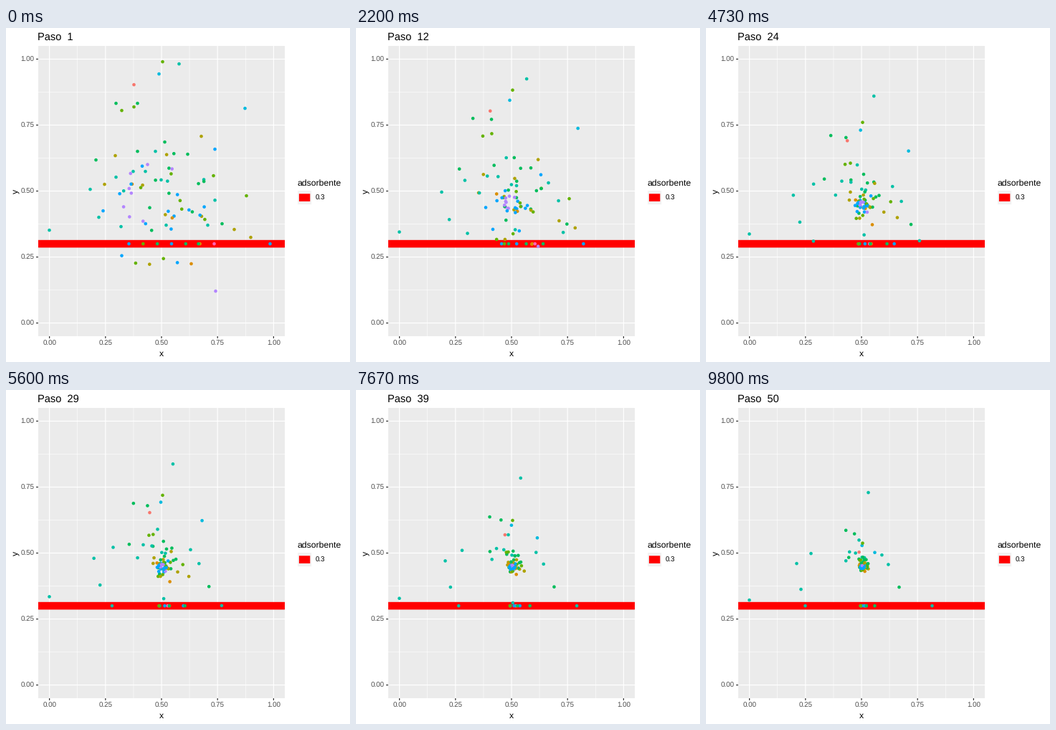
A matplotlib script that plays this animation: 480 px wide and 466 px high, repeating every 9.99 s.

```python
import numpy as np
import matplotlib.pyplot as plt
from matplotlib.animation import FuncAnimation
from matplotlib.patches import Rectangle

W, H, DPI = 480, 466, 100
FRAMES, LOOP_MS, STEPS = 150, 9990, 50
PT = 72 / DPI
plt.rcParams.update({"font.family": "Liberation Sans", "text.hinting": "none"})

LEFT, RIGHT, TOP, BOTTOM = 45, 389, 25, 430
BAR_Y, BAR_H = 301.1, 10.6
CORE = np.array([218.0, 246.5])
SOFT = 22               # distance at which the pull starts to fade

# Hue and pull speed (px per step) of each charge class
CLASSES = {
    "salmon": ("#F8766D", 3.5), "orange": ("#DB8E00", 3.0),
    "olive": ("#AEA200", 3.6), "lime": ("#64B200", 3.65),
    "green": ("#00BD5C", 2.15), "teal": ("#00C1A7", 0.9),
    "cyan": ("#00BADE", 3.4), "blue": ("#00A6FF", 4.8),
    "violet": ("#B385FF", 7.0), "pink": ("#FF63B6", 4.5),
}


def px(u):
    return LEFT + (RIGHT - LEFT) * (u + 0.05) / 1.1


def py(v):
    return BOTTOM - (BOTTOM - TOP) * (v + 0.05) / 1.1


# ---- particles ---------------------------------------------------------
rng = np.random.default_rng(9)
pulled, drifting = [], []      # (class, start, goal) and (class, start, shift)

# Lone particles far from the core
OUTER = {
    "salmon": [(178, 79)],
    "lime": [(218, 47), (178, 110), (161, 115), (335, 234), (289, 206)],
    "green": [(153, 105), (183, 105), (221, 159), (183, 172), (125, 184),
              (253, 176)],
    "olive": [(272, 151), (341, 292), (318, 281), (152, 178), (137, 218)],
    "cyan": [(213, 64), (333, 112)],
    "blue": [(291, 169), (135, 255)],
    "teal": [(208, 172), (177, 200), (194, 200)],
    "violet": [(292, 367)],
}
for name, starts in OUTER.items():
    pulled += [(name, p, CORE) for p in starts]

# The crowd: a seeded disc, flattened where it meets the band
CROWD = {"green": 9, "teal": 5, "lime": 5, "olive": 4, "orange": 2,
         "blue": 11, "violet": 8}
for name, count in CROWD.items():
    for _ in range(count):
        r, a = rng.uniform(18, 74), rng.uniform(0, 2 * np.pi)
        dx, dy = r * np.cos(a), r * np.sin(a)
        pulled.append((name, CORE + (dx, dy * (0.55 if dy > 0 else 1)), CORE))

# A few below the band, and a row caught on it
for x, name in zip(np.linspace(161, 258, 6),
                   ["blue", "lime", "olive", "lime", "blue", "orange"]):
    pulled.append((name, (x, rng.uniform(317, 331)), CORE))
row = ["blue", "lime", "green", "blue", "green", "orange", "pink"]
on_bar = list(zip(np.linspace(171, 290, len(row)), row)) + [(368, "blue")]
for x, name in on_bar:
    pulled.append((name, (x, 301), (CORE[0], 301)))

# Nearly neutral particles just drift
for name, start, shift in [
        ("teal", (241, 50), (-15, 93)), ("teal", (60, 282), (0, 11)),
        ("teal", (117, 225), (9, 17)), ("teal", (129, 264), (3, 14)),
        ("teal", (153, 208), (-7, 20)), ("teal", (160, 277), (-22, 42)),
        ("teal", (281, 275), (34, 45)), ("teal", (223, 275), (-6, 28)),
        ("green", (301, 273), (-32, 2)), ("green", (268, 301), (-33, 0))]:
    drifting.append((name, start, shift))

start = np.array([p for _, p, _ in pulled], float)
goal = np.array([g for _, _, g in pulled], float)
speed = np.array([CLASSES[n][1] for n, _, _ in pulled])
dist = np.maximum(np.hypot(*(start - goal).T), 1)
aim = (start - goal) / dist[:, None]
drift_start = np.array([p for _, p, _ in drifting], float)
drift_shift = np.array([d for _, _, d in drifting], float)
colors = [CLASSES[n][0] for n, _, _ in pulled + drifting]
order = rng.permutation(len(colors))


def positions(t):
    """Places after t steps; solves dr/dt = -v r^2 / (r^2 + SOFT^2)."""
    q = dist - SOFT ** 2 / dist - speed * t
    r = (q + np.sqrt(q * q + 4 * SOFT ** 2)) / 2
    falling = goal + aim * r[:, None]
    drift = drift_start + drift_shift * t / (STEPS - 1)
    drift[:, 1] = np.minimum(drift[:, 1], 301)     # the band stops them
    return (np.vstack([falling, drift]) + (0.5, 0.1))[order]


# ---- static stage ------------------------------------------------------
fig = plt.figure(figsize=(W / 100, H / 100), dpi=DPI, facecolor="white")
ax = fig.add_axes([0, 0, 1, 1])
ax.set(xlim=(0, W), ylim=(H, 0))
ax.axis("off")


def box(x, y, w, h, color, z):
    ax.add_patch(Rectangle((x, y), w, h, fc=color, ec="none", zorder=z,
                           snap=False))


def line(xs, ys, color, width, z):
    ax.plot(xs, ys, color=color, lw=width * PT, zorder=z, snap=False,
            solid_capstyle="butt")


def text(x, y, s, size, color="black", **kw):
    kw.setdefault("va", "baseline")
    return ax.text(x, y, s, fontsize=size * PT, color=color, **kw)


box(LEFT, TOP, RIGHT - LEFT, BOTTOM - TOP, "#EBEBEB", 0)
for v in (0.125, 0.375, 0.625, 0.875):
    line([px(v)] * 2, [TOP, BOTTOM], "white", 0.6, 1)
    line([LEFT, RIGHT], [py(v)] * 2, "white", 0.6, 1)
for v in (0, 0.25, 0.5, 0.75, 1):
    x, y, label = px(v), py(v), f"{v:.2f}"
    line([x, x], [TOP, BOTTOM], "white", 1.2, 2)
    line([LEFT, RIGHT], [y, y], "white", 1.2, 2)
    line([x, x], [BOTTOM, BOTTOM + 3], "#333333", 1.2, 2)
    line([LEFT - 3, LEFT], [y, y], "#333333", 1.2, 2)
    text(x, 443, label, 9.8, "#4D4D4D", ha="center")
    text(39.7, y + 3.6, label, 9.8, "#4D4D4D", ha="right")
box(LEFT, BAR_Y - BAR_H / 2, RIGHT - LEFT, BAR_H, "red", 3)

text(217, 457.5, "x", 12.2, ha="center")
text(13, 227.5, "y", 12.2, ha="center", va="center", rotation=90)
text(406.5, 220, "adsorbente", 12.2)
box(407, 227, 19.2, 19.2, "#F2F2F2", 1)
box(408.9, 236.6 - BAR_H / 2, 15.4, BAR_H, "red", 2)
text(431.5, 240.3, "0.3", 9.8)
title = text(44.5, 17, "", 14.6)

dots = ax.scatter(*positions(0).T, c=[colors[i] for i in order],
                  s=(4.6 * PT) ** 2, linewidths=0, zorder=4)


def update(i):
    dots.set_offsets(positions(min(i / 3, STEPS - 1)))
    title.set_text(f"Paso  {min(i // 3 + 1, STEPS)}")
    return dots, title


anim = FuncAnimation(fig, update, frames=FRAMES, interval=LOOP_MS / FRAMES,
                     repeat=True, repeat_delay=0, blit=False)
plt.show()
```
